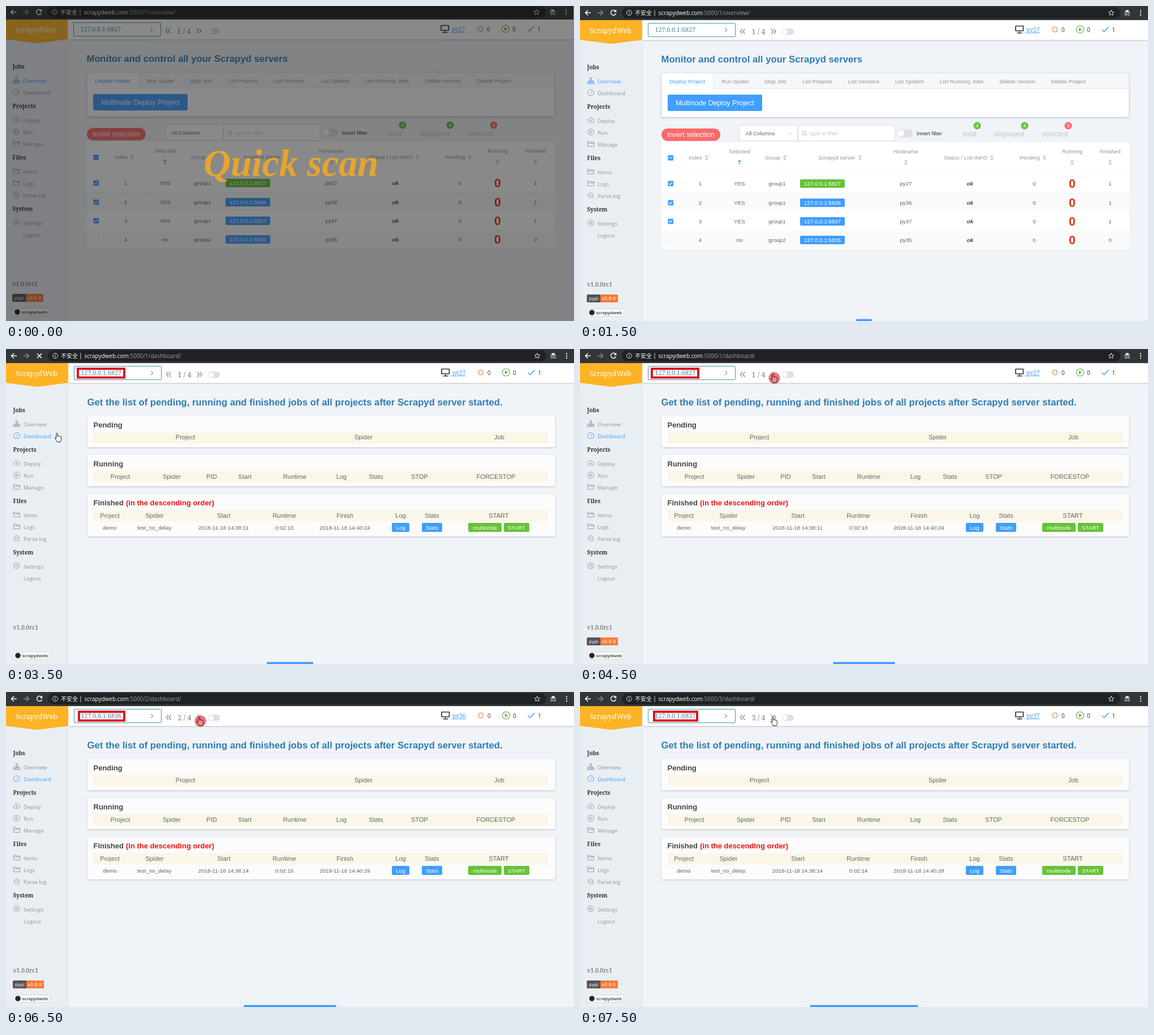
An HTML page that plays this animation: 1004x558 px, repeating every 8 s.

```html
<!DOCTYPE html>
<html lang="en">
<head>
<meta charset="utf-8">
<title>ScrapydWeb</title>
<style>
html, body { margin: 0; width: 100%; height: 100%; overflow: hidden; background: #f0f3f7; }
svg { display: block; position: absolute; left: 0; top: 0; }
text { font: 9.73px "Liberation Sans", Arial, sans-serif; fill: #606266; white-space: pre; }
.m { text-anchor: middle; }
.url { font: 10px "Open Sans", "Noto Sans CJK SC", sans-serif; fill: #9aa0a6; }
.nav { font: 9.5px "Open Sans", sans-serif; fill: currentColor; }
.sec { font: bold 10px "Noto Serif", serif; fill: #303133; }
.serif { font: 10.4px "Noto Serif", serif; fill: #5a5e66; }
.brand { font: 12.3px "Noto Serif", serif; fill: #fff; }
.addr { font: 10.8px "Noto Serif", serif; fill: #4a83a3; }
.pager { font: 12.5px "Noto Serif", serif; fill: #777; }
.link { font: 10.4px "Noto Serif", serif; fill: #409eff; text-decoration: underline; }
.count { font: 10px "Open Sans", sans-serif; fill: #303133; }
.h1 { font-size: 16.72px; font-weight: bold; fill: #2e7db6; }
.h3 { font-size: 13px; font-weight: bold; fill: #444; }
.red { fill: #f01010; }
.big { font-size: 12.5px; }
.th { font-size: 11.1px; fill: #666; }
.col { fill: #909399; }
.pale { fill: #c3c6cc; }
.white { fill: #fff; }
.blue { fill: #409eff; }
.dark { fill: #303133; }
.ok { font-weight: bold; font-style: italic; fill: #404246; }
.zero { font: bold 20.5px Roboto, sans-serif; fill: #e8321f; }
.tiny { font: 7.8px "DejaVu Sans", sans-serif; fill: #fff; }
.repo { font: 600 7.9px "Open Sans", sans-serif; fill: #333; }
.title { font: italic bold 66.7px "Liberation Serif", Times, serif; fill: #e6a52f; }
.line { fill: none; stroke: currentColor; }
.card { filter: drop-shadow(0 1px 1.5px rgba(0, 0, 0, .2)); }
.page { animation: nudge 8s step-end infinite; }
.bar { fill: #409eff; transform-origin: 502px 556px; animation: grow 8s step-end infinite; }
@keyframes nudge { 0% { transform: translate(-1px, -1px); } 18.75%, 100% { transform: none; } }
@keyframes grow {
  0% { transform: scaleX(0); }
  18.75% { transform: scaleX(1); }
  31.25% { transform: scaleX(2); }
  43.75% { transform: scaleX(3); }
  56.25% { transform: scaleX(4); }
  68.75% { transform: scaleX(5); }
  81.25% { transform: scaleX(6); }
  93.75%, 100% { transform: scaleX(7); }
}
</style>
</head>
<body>
<script>
const LOOP = 8000;
let css = '', spans = 0;

// Shows a group only from a to b (ms) of each loop.
const span = (a, b, html) => {
  const id = 'span' + spans++, pc = ms => ms / LOOP * 100 + '%';
  css += `@keyframes ${id}{0%{visibility:hidden}${pc(a)}{visibility:visible}${pc(b)},100%{visibility:hidden}}
.${id}{animation:${id} ${LOOP}ms step-end infinite}`;
  return `<g class="${id}">${html}</g>`;
};
const text = (x, y, s, cls = '') => `<text x="${x}" y="${y}" class="${cls}">${s}</text>`;
const mid = (x, y, s, cls = '') => text(x, y, s, 'm ' + cls);
const rect = (x, y, x2, y2, fill, r = 0, extra = '') =>
  `<rect x="${x}" y="${y}" width="${x2 - x}" height="${y2 - y}" rx="${r}" fill="${fill}" ${extra}/>`;
const circle = (x, y, r, fill, extra = '') => `<circle cx="${x}" cy="${y}" r="${r}" fill="${fill}" ${extra}/>`;
const path = (d, color, w = 1, x = 0, y = 0) =>
  `<path d="${d}" class="line" color="${color}" stroke-width="${w}" transform="translate(${x} ${y})"/>`;
const button = (x, y, x2, y2, s, fill) =>
  rect(x, y, x2, y2, fill, 2) + mid((x + x2) / 2, (y + y2) / 2 + 3.5, s, 'white');

const BLUE = '#409eff', GREEN = '#67c23a', RED = '#fa6a6a', GRAY = '#909399', EDGE = '#dcdfe6';

// Browser bar
const bar = () => {
  const reload = path('M4 -2.5A4.5 4.5 0 1 0 4.4 1.2M4.5 -5v3.2h-3.2', '#fff', 1.5, 59, 12);
  const stop = path('M-4 -4L4 4M4 -4L-4 4', '#fff', 1.6, 59, 12);
  const url = tail => text(138.5, 16, `<tspan fill="#fff">scrapydweb.com</tspan>:5000${tail}`, 'url');
  return rect(0, 0, 1004, 25, '#323639') + rect(74, 2, 955, 22, '#202124', 10) +
    path('M5 0H-4M0 -4.5L-4.5 0L0 4.5', '#fff', 1.5, 14, 12) +
    path('M-5 0H4M0 -4.5L4.5 0L0 4.5', '#85888c', 1.5, 36, 12) +
    span(0, 3500, reload) + span(3500, 4500, stop) + span(4500, LOOP, reload) +
    circle(87, 12, 4.5, 'none', 'stroke="#ddd"') + path('M0 -.8V2.6M0 -2.8v1.2', '#ddd', 1.1, 87, 12) +
    text(97, 15.8, '不安全', 'url white') + rect(131.5, 7, 132.5, 18, '#ccc') +
    span(0, 3500, url('/1/overview/')) + span(3500, 5500, url('/1/dashboard/')) +
    span(5500, 7500, url('/2/dashboard/')) + span(7500, LOOP, url('/3/dashboard/')) +
    path('M0 -4.8L1.4 -1.5L4.8 -1.3L2.2 .9L3 4.3L0 2.4L-3 4.3L-2.2 .9L-4.8 -1.3L-1.4 -1.5Z', '#ddd', 1, 939, 12) +
    '<path d="M962 11.5h10.5v-1h-2l-1-3.5h-4.5l-1 3.5h-2z" fill="#ddd"/>' +
    circle(964.8, 14.8, 1.7, 'none', 'stroke="#ddd"') + circle(969.8, 14.8, 1.7, 'none', 'stroke="#ddd"') +
    [8, 12, 16].map(y => circle(991, y, 1.2, '#eee')).join('');
};

// Sidebar
const folder = 'M-5.5 -4.5h4l1.2 1.6h5.8v7h-11zM-5.5 -1.3h11';
const ring = 'M-5.5 0a5.5 5.5 0 1 0 11 0a5.5 5.5 0 1 0 -11 0';
const icons = {
  Overview: 'M-1.5 -5.5h3v3h-3zM0 -2.5v4.5M-4.3 2v-2h8.6v2M-5.8 2h3v3h-3zM-1.5 2h3v3h-3zM2.8 2h3v3h-3z',
  Dashboard: 'M-3.5 4.5A5.5 5.5 0 1 1 3.5 4.5ZM-.5 1L2.5 -2.5',
  Deploy: 'M-2 3.5h-1.5a2.7 2.7 0 0 1 -.4 -5.3a4 4 0 0 1 7.8 0a2.7 2.7 0 0 1 -.4 5.3h-1.5M0 5v-6M-2 1L0 -1L2 1',
  Run: ring + 'M-1.5 -2.6L2.6 0L-1.5 2.6Z',
  Manage: folder, Items: folder, Logs: folder,
  'Parse log': 'M-4.8 0a4.5 4.5 0 1 1 9 0a4.5 4.5 0 1 1 -9 0M3 3l2.5 2.5M-4.5 1.5L-1.5 -1.2L.5 .8L3 -2',
  Settings: 'M0 -5.5L4.9 -2.8V2.8L0 5.5L-4.9 2.8V-2.8ZM-1.8 0a1.8 1.8 0 1 0 3.6 0a1.8 1.8 0 1 0 -3.6 0'
};
const item = (label, y, color = GRAY) => `<g color="${color}">` + text(31, y + 4, label, 'nav') +
  (icons[label] ? path(icons[label], color, .9, 19, y - .5) : '') + '</g>';

const sidebar = () => {
  const badge = rect(12, 511, 67, 525, '#555', 2) + rect(36, 511, 67, 525, '#fb7a37', 2) +
    rect(36, 511, 40, 525, '#fb7a37') + text(16, 521, 'pypi', 'tiny') + text(38.5, 521, 'v0.9.9', 'tiny');
  return rect(0, 25, 110, 560, '#e9eef3') + rect(109.5, 60, 110.5, 560, '#e0e5ea') +
    '<path d="M0 25H110V60L55 67L0 60Z" fill="#fdb324"/>' + mid(54, 47.5, 'ScrapydWeb', 'brand') +
    [['Jobs', 112], ['Projects', 182], ['Files', 272.5], ['System', 363.5]].map(([s, y]) => text(12.5, y, s, 'sec')).join('') +
    span(0, 3500, item('Overview', 133, BLUE)) + span(3500, LOOP, item('Overview', 133)) +
    span(0, 2500, item('Dashboard', 154)) +
    span(2500, 3500, rect(0, 144, 110, 165, '#fff') + item('Dashboard', 154, '#303133')) +
    span(3500, LOOP, item('Dashboard', 154, BLUE)) +
    [['Deploy', 203], ['Run', 224], ['Manage', 245], ['Items', 294], ['Logs', 315], ['Parse log', 336],
      ['Settings', 384.5], ['Logout', 405.5]].map(a => item(...a)).join('') +
    text(12.5, 497, 'v1.0.0rc1', 'serif') + span(0, 3500, badge) + span(4500, LOOP, badge) +
    rect(12.5, 536.5, 77.5, 549.5, '#fafafa', 2, 'stroke="#d4d8dc"') +
    circle(21, 543, 4.8, '#24292e') + text(28.5, 546, 'scrapydweb', 'repo');
};

// Top strip with the node picker
const toggle = (x, y, w, h) => rect(x, y, x + w, y + h, EDGE, h / 2) + circle(x + h / 2, y + h / 2, h / 2 - 1, '#fff');
const node = (n, port, py) => text(132.5, 46.3, '127.0.0.1:' + port, 'addr') +
  mid(315.5, 50.3, n + ' / 4', 'pager') + text(789, 46, py, 'link');
const frame = (x, x2) => rect(x + 2, 35, x2 - 2, 50.5, 'none', 0, 'stroke="#e01020" stroke-width="4"');

const header = () => {
  let spin = '';
  for (let i = 0; i < 8; i++) {
    const a = i * Math.PI / 4, c = Math.cos(a), s = Math.sin(a);
    spin += `M${3 * c} ${3 * s}L${5.6 * c} ${5.6 * s}`;
  }
  return rect(110, 25, 1006, 60, '#fff', 0, 'class="card"') +
    rect(120.5, 30.5, 274.5, 54.5, '#fff', 1, 'stroke="#3f98a6"') +
    path('M-2 -3.5L2 0L-2 3.5', '#666', 1, 258, 42.5) +
    path('M-.5 -4.5L-4 0L-.5 4.5M4 -4.5L.5 0L4 4.5', '#666', 1.1, 287.5, 45) +
    path('M-4 -4.5L-.5 0L-4 4.5M.5 -4.5L4 0L.5 4.5', '#666', 1.1, 342, 45) + toggle(357, 40, 21, 11) +
    rect(770, 35.5, 783.5, 44, 'none', .5, 'stroke="#333" stroke-width="1.7"') + path('M777 44v3.5M772.5 47.7h9', '#333', 1.4) +
    rect(783, 47, 789, 47.8, '#8fc4f5') +
    span(0, 5500, node(1, 6827, 'py27')) + span(5500, 7500, node(2, 6836, 'py36')) + span(7500, LOOP, node(3, 6837, 'py37')) +
    span(3500, 5500, frame(125, 211)) + span(5500, 7500, frame(127, 211)) + span(7500, LOOP, frame(129, 209)) +
    path(spin, '#e8763a', 1.5, 839.5, 41.5) + text(851, 46, '0', 'count') +
    path('M-6.5 0a6.5 6.5 0 1 0 13 0a6.5 6.5 0 1 0 -13 0', '#5fae3c', 1.2, 884, 41.5) +
    '<path d="M882 38.3l5 3.2l-5 3.2z" fill="#5fae3c"/>' + text(896, 46, '0', 'count') +
    path('M-6 .5L-2 4L6 -4.5', BLUE, 1.4, 928.5, 41.5) + text(940.5, 46, '1', 'count');
};

// Overview page
const carets = (x, y, up = '#c0c4cc') =>
  `<path d="M${x - 3.3} ${y - 1}l3.3 -3.4l3.3 3.4z" fill="${up}"/><path d="M${x - 3.3} ${y + 1}l3.3 3.4l3.3 -3.4z" fill="#c0c4cc"/>`;
const check = (y, mark) => rect(155.5, y - 4.8, 165, y + 4.8, mark ? BLUE : '#fff', 1, mark ? '' : `stroke="${EDGE}"`) +
  (mark ? path(mark, '#fff', 1.2, 160.2, y) : '');

const row = (i, port, py, group, on, done) => {
  const y = Math.round(315.2 + i * 33.4), b = y + 3;
  return rect(144, y - 17, 971, y + 16.4, i % 2 ? '#fafafa' : '#fff') + rect(144, y + 16, 971, y + 16.8, '#ebeef5') +
    check(y - .5, on && 'M-2.6 0L-.7 2L2.7 -2.2') + mid(212.5, b, i + 1) + mid(282, b, on ? 'YES' : 'no') +
    mid(348.5, b, group) + button(389, y - 8, 468, y + 7, '127.0.0.1:' + port, i ? BLUE : GREEN) +
    mid(576, b, py) + mid(689.5, b, 'ok', 'ok') + mid(803, b, '0') + mid(870, y + 7, '0', 'zero') + mid(937, b, done);
};

const overview = () => {
  const tabs = [[250, 'Run Spider'], [326, 'Stop Job'], [393, 'List Projects'], [474, 'List Versions'], [557, 'List Spiders'],
    [636, 'List Running Jobs'], [741.5, 'Delete Version'], [833, 'Delete Project']];
  const totals = [[677, 702, 'total', 4, GREEN], [732, 786, 'displayed', 4, GREEN], [816, 863, 'selected', 3, RED]];
  const inline = [[192, 224, 'Index'], [327, 362, 'Group'], [421, 495, 'Scrapyd server'], [643, 728, 'Status / List INFO'], [777, 821, 'Pending']];
  const stacked = [[282, 'Selected', BLUE], [576, 'Hostname'], [870, 'Running'], [937, 'Finished']];
  return text(143.5, 100, 'Monitor and control all your Scrapyd servers', 'h1') +
    rect(144, 119, 970.5, 197, '#fff', 0, `class="card" stroke="${EDGE}"`) +
    rect(144.5, 119.5, 970, 147, '#f5f7fa') + rect(144, 146.2, 970.5, 147, '#e4e7ed') +
    rect(144.5, 119.5, 236, 147.5, '#fff') + rect(235.5, 119.5, 236.3, 147, EDGE) +
    text(158, 137, 'Deploy Project', 'blue') + tabs.map(([x, s]) => text(x, 137, s, 'col')).join('') +
    rect(155, 157, 322, 186, BLUE, 2) + mid(238.5, 176, 'Multinode Deploy Project', 'big white') +
    rect(144, 217, 248, 239, RED, 11) + mid(196, 232, 'invert selection', 'big white') +
    rect(282, 211.5, 384.5, 239, '#fff', 2, `stroke="${EDGE}"`) + text(292.5, 229, 'All Columns') +
    path('M-3.5 -2L0 1.8L3.5 -2', '#c0c4cc', 1, 372.5, 226) +
    rect(386, 211.5, 556.5, 239, '#fff', 2, `stroke="${EDGE}"`) +
    path('M-4 -.8a3.3 3.3 0 1 0 6.6 0a3.3 3.3 0 1 0 -6.6 0M1.8 1.8L4.3 4.3', '#b4b8bf', 1, 397, 226) +
    text(406, 229, 'type to filter', 'pale') + toggle(560, 218.5, 28, 14) + text(595, 229, 'invert filter', 'dark') +
    totals.map(([x, bx, s, n, fill]) => text(x, 231, s, 'big pale') + circle(bx, 212, 6.5, fill) + mid(bx, 215, n, 'white')).join('') +
    rect(144, 241, 971, 298, '#fff') + rect(144, 297.6, 971, 298.4, '#ebeef5') + check(269, 'M-2.6 0H2.6') +
    inline.map(([x, cx, s]) => text(x, 271.5, s, 'col') + carets(cx, 268.5)).join('') +
    stacked.map(([x, s, up]) => mid(x, 261, s, 'col') + carets(x, 277, up)).join('') +
    row(0, 6827, 'py27', 'group1', true, 1) + row(1, 6836, 'py36', 'group1', true, 1) +
    row(2, 6837, 'py37', 'group1', true, 1) + row(3, 6835, 'py35', 'group2', false, 0);
};

// Dashboard page
const panel = (y, y2, title, heads) => rect(144, y, 970.5, y2, '#fcfcfc', 0, 'class="card"') +
  text(154.5, y + 20.5, title, 'h3') + rect(155, y + 28, 959, y + 49, '#faf7e8') +
  heads.map(([x, s]) => mid(x, y + 41.8, s, 'th')).join('');

const dashboard = () => text(143.5, 100, 'Get the list of pending, running and finished jobs of all projects after Scrapyd server started.', 'h1') +
  panel(118.5, 174, 'Pending', [[317, 'Project'], [632, 'Spider'], [872, 'Job']]) +
  panel(187.7, 243, 'Running', [[202, 'Project'], [293, 'Spider'], [363.5, 'PID'], [422, 'Start'], [510.5, 'Runtime'],
    [593, 'Log'], [654, 'Stats'], [731, 'STOP'], [866, 'FORCESTOP']]) +
  panel(256.8, 332, 'Finished', [[183.5, 'Project'], [262.5, 'Spider'], [385, 'Start'], [492, 'Runtime'], [599, 'Finish'],
    [697.5, 'Log'], [753, 'Stats'], [871, 'START']]) +
  text(212, 277.3, '(in the descending order)', 'h3 red') + mid(183.5, 319.5, 'demo') + mid(262, 319.5, 'test_no_delay') +
  button(682, 308, 713, 324, 'Log', BLUE) + button(735, 308, 771, 324, 'Stats', BLUE) +
  button(817, 308, 876, 324, 'multinode', GREEN) + button(880, 308, 925, 324, 'START', GREEN);
const job = (start, runtime, finish) => mid(384.5, 319.5, '2018-11-18 14:38:' + start) +
  mid(492, 319.5, '0:02:' + runtime) + mid(599, 319.5, '2018-11-18 14:40:' + finish);

// Pointer, with a red spot while it clicks
const hand = (x, y, click) => (click ? circle(x + 2.5, y + 7.5, 10.2, '#ee656b', 'opacity=".9"') : '') +
  `<path transform="translate(${x} ${y})" fill="${click ? '#f58c90' : '#fff'}" stroke="#222" stroke-linejoin="round"
  d="M-1.2 9.5V1.2a1.2 1.2 0 0 1 2.4 0V6a1.1 1.1 0 0 1 2.2 .2a1.1 1.1 0 0 1 2.2 .5a1.1 1.1 0 0 1 2 .7V11q0 2 -1.2 3.5v1.2h-6v-1.2q-2 -2 -3.8 -5.2q-.6 -1.2 .5 -1.6q.8 -.1 1.7 1.8z"/>`;

const scene = `<g class="page">` + rect(110, 25, 1006, 560, '#f0f3f7') + header() + sidebar() + bar() +
  span(0, 3500, overview()) + span(3500, LOOP, dashboard()) +
  span(3500, 5500, job(11, 13, 24)) + span(5500, 7500, job(14, 15, 29)) + span(7500, LOOP, job(14, 14, 28)) + '</g>' +
  span(2500, 3500, hand(90, 149, true)) + span(3500, 4500, hand(90, 149)) +
  span(4500, 5500, hand(341, 44, true)) + span(5500, 6500, hand(341, 44)) +
  span(6500, 7500, hand(341, 44, true)) + span(7500, LOOP, hand(341, 44)) +
  rect(488.4, 554.5, 515.6, 558, '', 0, 'class="bar"') +
  span(0, 1500, rect(0, 0, 1004, 558, 'rgba(20,20,20,.5)') + text(349, 300.8, 'Quick scan', 'title'));

document.head.insertAdjacentHTML('beforeend', `<style>${css}</style>`);
document.body.insertAdjacentHTML('beforeend', `<svg width="1004" height="558" viewBox="0 0 1004 558">${scene}</svg>`);
</script>
</body>
</html>
```
